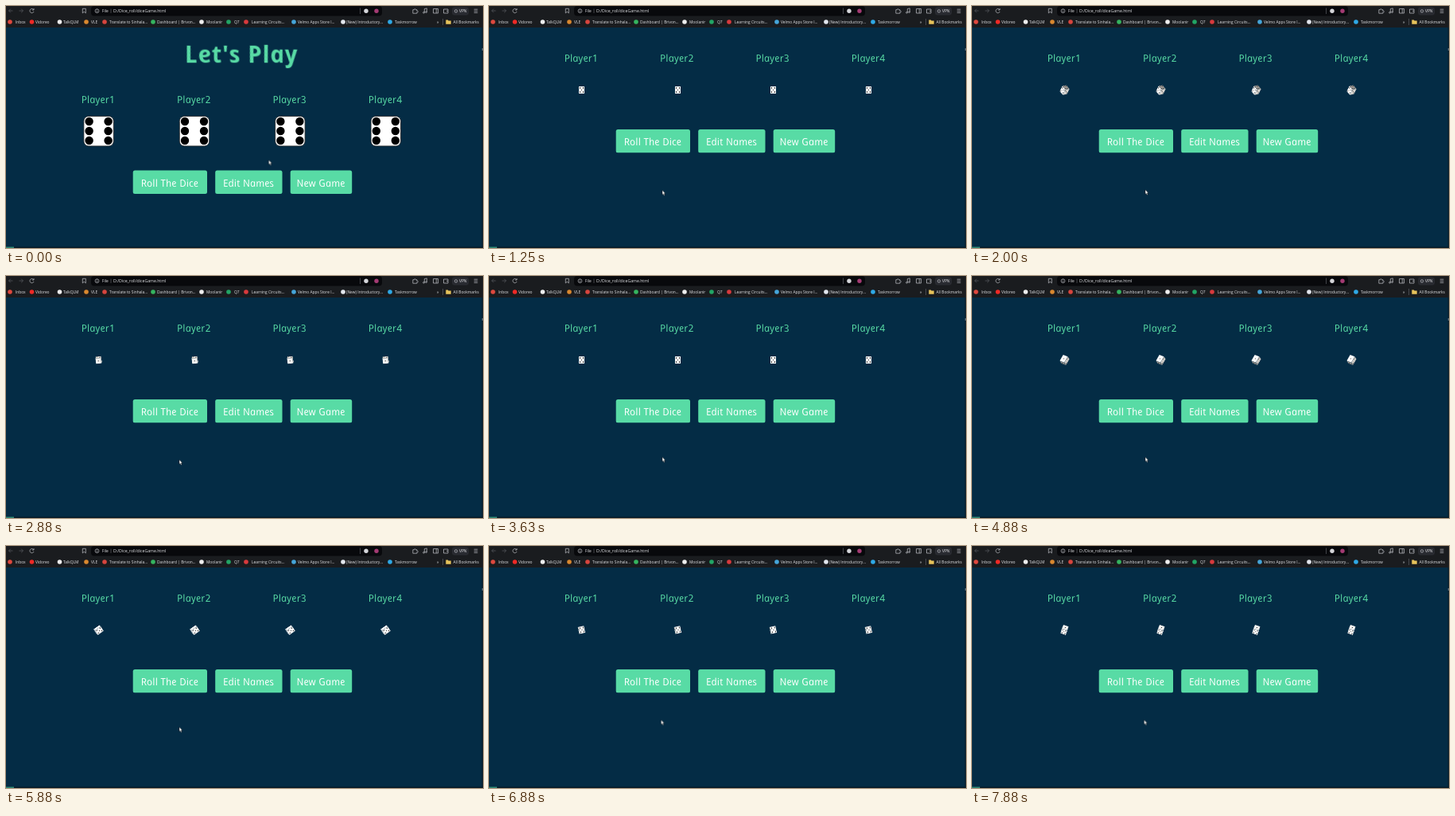
An HTML page that plays this animation: 600x304 px, repeating every 8 s.

```html
<!DOCTYPE html>
<html lang="en">
<head>
<meta charset="utf-8">
<title>Dice game</title>
<style>
  html, body { margin: 0; width: 100%; height: 100%; overflow: hidden; background: #042c45; }
  #stage { position: relative; width: 600px; height: 304px; overflow: hidden; }
  svg { position: absolute; left: 0; top: 0; }

  .hand { font: italic 500 12.5px "Open Sans", "Noto Sans", sans-serif; letter-spacing: .2px; text-anchor: middle; }
  .heading { font-size: 30px; font-weight: 700; letter-spacing: .9px; }
  .green { fill: #58dba5; }
  .white { fill: #fff; }
  .ui { font: 4.85px "Open Sans", "Noto Sans", sans-serif; fill: #e4e5e8; }
  .url { font-size: 5.2px; }
  .line { fill: none; stroke: #c3c5ca; stroke-width: .7; }
  .dim { stroke: #5b5d63; }

  #page { animation: lift 8s step-end infinite; }
  .before { animation: leave 8s step-end infinite; }
  #dice { animation: arrive 8s step-end infinite; }
  #cursor { animation: point 8s linear infinite; }

  .die { position: absolute; top: 101px; width: 7px; height: 9px;
         transform-style: preserve-3d; animation: tumble 8s linear infinite; }
  .face { position: absolute; left: 0; top: 0; width: 7px; height: 9px; backface-visibility: hidden; }
  .cap { top: 1px; height: 7px; }

  @keyframes lift { 0% { transform: none; } 9.375%, 100% { transform: translateY(-51.5px); } }
  @keyframes leave { 0% { visibility: visible; } 9.375%, 100% { visibility: hidden; } }
  @keyframes arrive { 0% { visibility: hidden; } 9.375%, 100% { visibility: visible; } }
  @keyframes point {
    0%, 1.6% { transform: translate(330.5px, 193.5px); }
    7% { transform: translate(221px, 222px); }
    9.4% { transform: translate(218px, 226px); }
    12.5%, 22% { transform: translate(218px, 231.5px); }
    25%, 37% { transform: translate(218px, 230.8px); }
    42%, 75% { transform: translate(218px, 227.5px); }
    83%, 100% { transform: translate(216.5px, 218.5px); }
  }
  @keyframes tumble {
    0%, 9.375% { transform: rotateZ(-60deg) rotateX(-180deg) rotateY(-90deg); }
    12.5%, 17.1% { transform: rotateZ(0deg) rotateX(0deg) rotateY(0deg); }
    25%, 26.5% { transform: rotateZ(25deg) rotateX(145deg) rotateY(218deg); }
    45.3%, 46.8% { transform: rotateZ(0deg) rotateX(360deg) rotateY(360deg); }
    50%, 53% { transform: rotateZ(-18deg) rotateX(330deg) rotateY(385deg); }
    61%, 62.5% { transform: rotateZ(30deg) rotateX(375deg) rotateY(240deg); }
    72%, 73.5% { transform: rotateZ(55deg) rotateX(545deg) rotateY(520deg); }
    86%, 89% { transform: rotateZ(-12deg) rotateX(720deg) rotateY(728deg); }
    92%, 93.7% { transform: rotateZ(-30deg) rotateX(770deg) rotateY(690deg); }
    98.4%, 100% { transform: rotateZ(16deg) rotateX(675deg) rotateY(715deg); }
  }
</style>
</head>
<body>
<div id="stage">
  <svg width="600" height="304" viewBox="0 0 600 304">
    <rect width="600" height="304" fill="#042c45"/>
    <g id="page">
      <g class="before">
        <text class="hand heading green" transform="translate(298 71) skewX(12)">Let's Play</text>
        <g id="sixes"></g>
      </g>
      <g id="players"></g>
      <g id="buttons"></g>
    </g>
    <path d="M598.5 27h1.500v277h-1.500z" fill="#0b1f2d"/>
    <path d="M598.700 53h1.300v3h-1.300z" fill="#5d6c75"/>
    <path d="M0 302.500h600v1.500H0z" fill="#071a26"/>
    <path d="M0 302.500h10v1.500H0z" fill="#2f8a78"/>

    <g id="browser">
      <rect width="600" height="27" fill="#1a1c1f"/>
      <rect x="107" width="366" height="12.5" rx="4" fill="#08090c"/>
      <g class="line">
        <path class="dim" d="M8.500 6h-5m2.300-2.300L3.500 6l2.300 2.300M16.500 6h5m-2.300-2.300L21.500 6l-2.300 2.300"/>
        <path d="M34.600 4.500A2.600 2.600 0 1 0 35 7M35 3v2h-2"/>
        <path d="M96.300 3.300h4v5.600l-2-1.700-2 1.700z"/>
        <circle cx="114.5" cy="6.200" r="2.400"/>
        <path d="M114.500 5.800v1.800M114.500 4.500v.6"/>
        <path class="dim" d="M132 3.500v5.500M445.500 2.500v7.500M549.500 16v8"/>
        <path d="M511.800 4.700h1.600a1 1 0 1 1 2 0h1.400v1.500a1 1 0 1 1 0 1.700v1.300h-5z"/>
        <path d="M526.300 8.300V3.600l3-.7v4.700"/>
        <circle cx="525.5" cy="8.300" r=".9"/><circle cx="528.5" cy="7.600" r=".9"/>
        <path d="M537.500 3.500h6v5.500h-6zM541.300 3.500V9"/>
        <path d="M550.500 4h5.500v5h-5.500zM554 6.300h2"/>
        <path d="M588.700 4.200h4.600M588.700 6.300h4.600M588.700 8.400h4.600"/>
      </g>
      <circle cx="453" cy="6.200" r="2.700" fill="#d5d6da"/>
      <circle cx="466" cy="6.200" r="2.700" fill="#a33a72"/>
      <rect x="561" y="1.500" width="21" height="10" rx="3" fill="#292b31"/>
      <circle cx="566" cy="6.400" r="1.700" class="line"/>
      <text class="ui" x="121" y="8">File</text>
      <text class="ui url" x="135" y="8">D:/Dice_roll/diceGame.html</text>
      <text class="ui" x="570" y="8.100">VPN</text>
      <text class="ui" x="542" y="21.500">»</text>
      <text class="ui" x="562.5" y="21.800">All Bookmarks</text>
      <path d="M553.300 17.500h2.500l.8.900h3.100v4.300h-6.400z" fill="#e7c35b"/>
      <g id="bookmarks"></g>
    </g>
    <g id="cursor">
      <path d="M0 0v5.500l1.200-1.100.9 2 1.100-.4-.9-2h1.600z" fill="#fff" stroke="#000" stroke-width=".4"/>
    </g>
  </svg>
  <div id="dice"></div>
</div>
<script>
  const byId = id => document.getElementById(id);
  const columns = [0, 1, 2, 3].map(i => 116.6 + 120.4 * i);
  const handText = (x, y, text, color) =>
    `<text class="hand ${color}" transform="translate(${x} ${y}) skewX(12)">${text}</text>`;

  byId("players").innerHTML =
    columns.map((x, i) => handText(x, 121.5, "Player" + (i + 1), "green")).join("");

  byId("sixes").innerHTML = columns.map(x => {
    const pips = [-12, 12].flatMap(dx => [-12, 0, 12].map(dy =>
      `<circle cx="${x + dx}" cy="${157 + dy}" r="5.2"/>`)).join("");
    return `<rect x="${x - 18.7}" y="138.5" width="37.4" height="37.4" rx="6" fill="#fff" stroke="#252525" stroke-width=".8"/>${pips}`;
  }).join("");

  byId("buttons").innerHTML = [
    [159.7, 93.3, "Roll The Dice"], [263.2, 84.3, "Edit Names"], [357.7, 77.5, "New Game"]
  ].map(([x, width, label]) =>
    `<rect class="green" x="${x}" y="206.4" width="${width}" height="29.5" rx="2.5"/>` +
    handText(x + width / 2 + .4, 226.5, label, "white")
  ).join("");

  byId("bookmarks").innerHTML = [
    [5, 12, "#e0493e", "Inbox"],
    [32.5, 37, "#ee2a26", "Vidoreo"],
    [67.5, 72, "#eeeeee", "TalkQLM"],
    [101, 107, "#d9882f", "VLE"],
    [124, 130, "#d8453e", "Translate to Sinhala..."],
    [185, 190, "#35b45f", "Dashboard | Brivon..."],
    [246, 252, "#eeeeee", "Moolanir"],
    [280, 287, "#22a565", "Q7"],
    [302, 309, "#d83a3d", "Learning Circuits..."],
    [362, 367, "#45a5d9", "Velmo Apps Store I..."],
    [424, 428, "#e3e7ee", "(New) Introductory..."],
    [483, 489, "#2fa9e6", "Taskmorrow"]
  ].map(([iconX, textX, color, label]) =>
    `<circle cx="${iconX}" cy="20" r="2.8" fill="${color}"/><text class="ui" x="${textX}" y="21.8">${label}</text>`
  ).join("");

  // Pip positions in percent of the face
  const corners = [[25, 22], [75, 78]], others = [[75, 22], [25, 78]];
  const middle = [[50, 50]], sides = [[25, 50], [75, 50]];
  const face = (turn, depth, color, pips, cap = "") => {
    const dots = pips.map(([x, y]) =>
      `radial-gradient(circle at ${x}% ${y}%, #111 .5px, transparent .9px)`).join();
    return `<div class="face ${cap}" style="transform:${turn} translateZ(${depth}px);background:${dots},${color}"></div>`;
  };
  const cube =
    face("rotateY(0deg)", 3.5, "#fff", [...corners, ...others, ...middle]) +
    face("rotateY(180deg)", 3.5, "#c9c6c2", corners) +
    face("rotateY(90deg)", 3.5, "#fff", middle) +
    face("rotateY(-90deg)", 3.5, "#d8d5d0", [...corners, ...middle]) +
    face("rotateX(90deg)", 4.5, "#f4f3f1", middle, "cap") +
    face("rotateX(-90deg)", 4.5, "#aaa7a3", [...corners, ...others, ...sides], "cap");

  byId("dice").innerHTML = columns.map(x =>
    `<div class="die" style="left:${x - 3.5}px">${cube}</div>`).join("");
</script>
</body>
</html>
```
